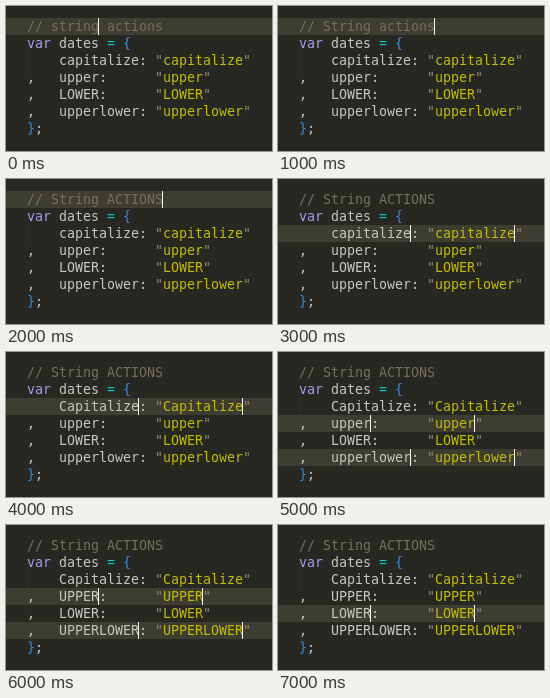
These frames come from a looping animation (266 px wide and 145 px high, 8 s). An HTML page:

```html
<!DOCTYPE html>
<html lang="en">
<meta charset="utf-8">
<title>Changing case in an editor</title>
<style>
  html, body { margin: 0; width: 100%; height: 100%; overflow: hidden; background: #272822; }
  svg { display: block; }
  text { font: 13.29px "DejaVu Sans Mono", monospace; fill: #c4c8be; white-space: pre; }
  .comment { fill: #75715e; }
  .keyword { fill: #a79df0; }
  .string { fill: #c0bc04; }
  .quote { fill: #8f8f74; }
  .operator { fill: #08c8c8; }
  .brace { fill: #348cdc; }
  .active { fill: #3e3d32; }
  .caret { fill: #f8f8f0; }
  .guide { stroke: #3c3d36; stroke-dasharray: 1; }
</style>
<svg id="editor" width="266" height="145" viewBox="0 0 266 145"></svg>
<script>
const editor = document.getElementById('editor');
const LEFT = 21, TOP = 12, CHAR = 8, LINE = 17, STEP = 1000;

// Each step: comment, three words, and [line, column] of every caret.
const plain = ['capitalize', 'upper', 'upperlower'];
const capital = ['Capitalize', 'upper', 'upperlower'];
const shouted = ['Capitalize', 'UPPER', 'UPPERLOWER'];
const first = [[2, 14], [2, 27]];
const uppers = [[3, 9], [3, 22], [5, 14], [5, 27]];
const steps = [
  ['string actions', plain, [[0, 9]]],
  ['String actions', plain, [[0, 17]]],
  ['String ACTIONS', plain, [[0, 17]]],
  ['String ACTIONS', plain, first],
  ['String ACTIONS', capital, first],
  ['String ACTIONS', capital, uppers],
  ['String ACTIONS', shouted, uppers],
  ['String ACTIONS', shouted, [[4, 9], [4, 22]]]
];

const span = (name, text) => `<tspan class="${name}">${text}</tspan>`;
const quote = span('quote', '"');
const entry = (lead, word) =>
  `${lead}   ${(word + ':').padEnd(12)}` + quote + span('string', word) + quote;

function draw([comment, [cap, upper, both], carets]) {
  const lines = [
    span('comment', '// ' + comment),
    `${span('keyword', 'var')} dates ${span('operator', '=')} ${span('brace', '{')}`,
    entry(' ', cap),
    entry(',', upper),
    entry(',', 'LOWER'),
    entry(',', both),
    span('brace', '}') + ';'
  ];
  const y = row => TOP + row * LINE;
  const rows = [...new Set(carets.map(([row]) => row))];
  editor.innerHTML =
    rows.map(row => `<rect class="active" y="${y(row)}" width="266" height="${LINE}"/>`).join('') +
    `<path class="guide" d="M${LEFT + 0.5} ${y(2)}v${LINE}"/>` +
    lines.map((line, row) => `<text x="${LEFT}" y="${y(row) + 13}">${line}</text>`).join('') +
    carets.map(([row, col]) =>
      `<rect class="caret" x="${LEFT + col * CHAR - 1}" y="${y(row)}" width="1" height="${LINE}"/>`
    ).join('');
}

let shown = -1;
function tick() {
  const step = Math.floor(performance.now() / STEP) % steps.length;
  if (step !== shown) draw(steps[shown = step]);
  requestAnimationFrame(tick);
}
tick();
</script>
</html>
```
